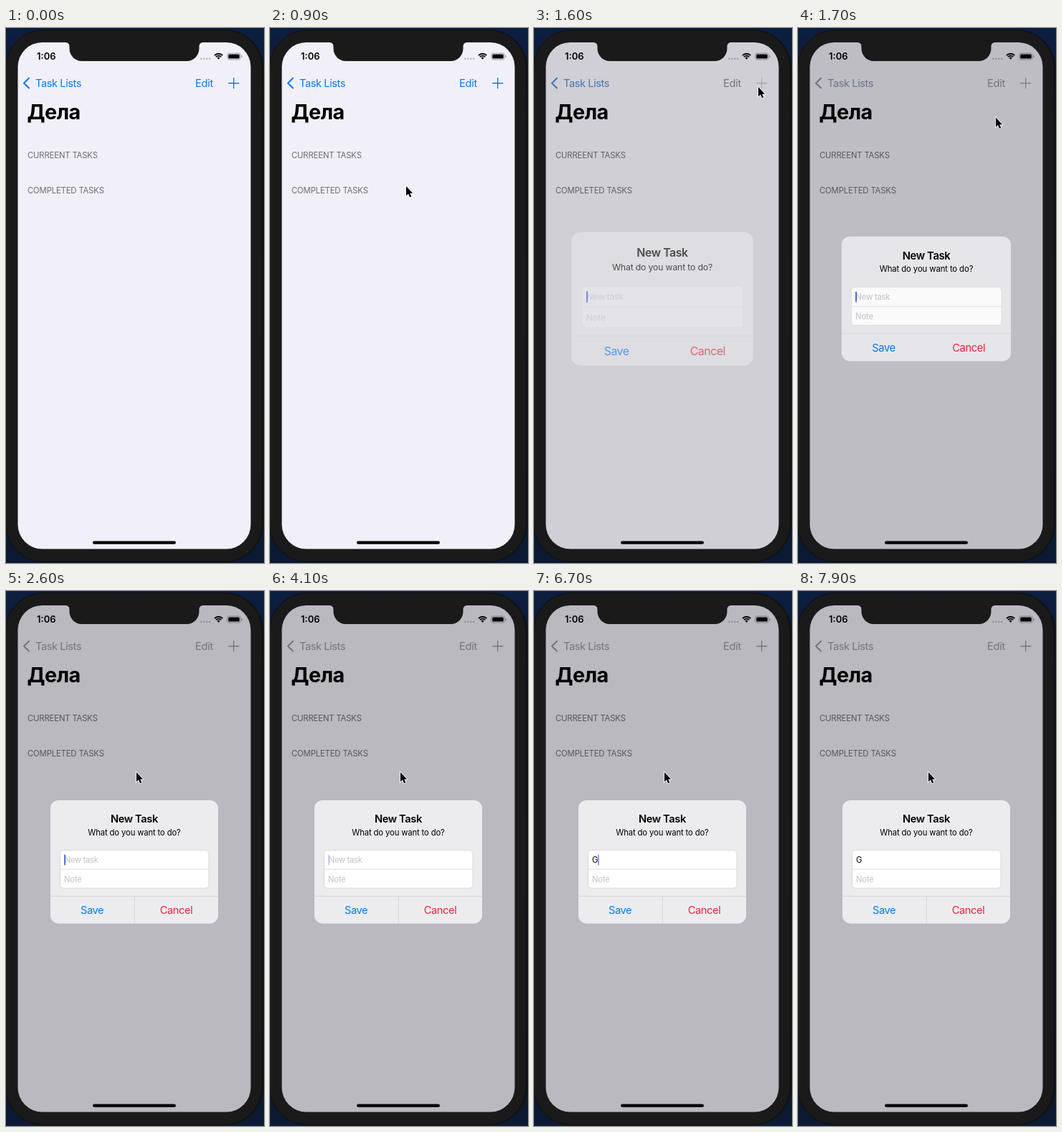
An HTML page with a canvas for the animation above (8 s loop, 360 px wide and 744 px high).

```html
<!DOCTYPE html>
<html lang="en">
<head>
<meta charset="utf-8">
<title>New task dialog</title>
<style>
html, body { margin: 0; width: 100%; height: 100%; overflow: hidden; background: #0a1730; }
canvas { display: block; width: 360px; height: 744px; }
</style>
</head>
<body>
<canvas id="stage"></canvas>
<script>
const W = 360, H = 744, LOOP = 8000, STEP = 100;
const canvas = document.getElementById('stage');
const ratio = window.devicePixelRatio || 1;
canvas.width = W * ratio;
canvas.height = H * ratio;
const ctx = canvas.getContext('2d');

// Motion tracks: [time, value, ...]
const POINTER = [[400, 200, 744], [600, 190, 430], [800, 182, 235], [900, 190, 220],
  [1200, 320, 71], [1500, 320, 71], [1600, 313, 82], [1700, 276, 124.5],
  [1800, 230, 187], [1900, 198, 235], [2000, 184, 250], [2100, 182, 252]];
const DIM = [[1500, 0], [1600, 0.6], [1700, 0.92], [1800, 1]];
const PRESS = [[1400, 0], [1500, 0.7], [1600, 0.6], [1700, 0.2], [1800, 0]];
const SHEET = [[1500, 0, 1.17], [1600, 0.5, 1.083], [1700, 0.88, 1.01], [1800, 1, 1]];
const TYPED_AT = 5500;
const CARET = [[6200, 1], [6400, 0], [6500, 0], [6800, 1], [6900, 1],
  [7200, 0], [7400, 0], [7600, 1], [7700, 1], [7900, 0]];

const MID_X = 179, SHEET_Y = 376.6;
const SCREEN = { x: 16.5, y: 20, w: 325, h: 704.5 };

const clamp = v => Math.min(1, Math.max(0, v));
const lerp = (a, b, k) => a + (b - a) * k;

function at(track, t) {
  if (t <= track[0][0]) return track[0].slice(1);
  for (let i = 1; i < track.length; i++) {
    const a = track[i - 1], b = track[i];
    if (t <= b[0]) {
      const k = (t - a[0]) / (b[0] - a[0]);
      return a.slice(1).map((v, j) => lerp(v, b[j + 1], k));
    }
  }
  return track[track.length - 1].slice(1);
}

function mix(a, b, k) {
  const part = (s, i) => parseInt(s.substr(1 + i * 2, 2), 16);
  return 'rgb(' + [0, 1, 2].map(i => Math.round(lerp(part(a, i), part(b, i), k))) + ')';
}

function box(x, y, w, h, r, fill) {
  ctx.beginPath();
  ctx.roundRect(x, y, w, h, r);
  ctx.fillStyle = fill;
  ctx.fill();
}

function text(str, x, y, size, color, { weight = 400, gap = 0, align = 'left' } = {}) {
  ctx.font = `${weight} ${size}px Inter, "Open Sans", sans-serif`;
  ctx.letterSpacing = gap + 'px';
  ctx.textAlign = align;
  ctx.fillStyle = color;
  ctx.fillText(str, x, y);
}

function stroke(points, color, width) {
  ctx.beginPath();
  points.forEach(([x, y], i) => i ? ctx.lineTo(x, y) : ctx.moveTo(x, y));
  ctx.strokeStyle = color;
  ctx.lineWidth = width;
  ctx.stroke();
}

function drawNotch() {
  const left = MID_X - 90.5, right = MID_X + 90.5;
  const top = SCREEN.y, bottom = top + 26, flare = 5.2, r = 17.3;
  ctx.beginPath();
  ctx.moveTo(left - flare, top - 1);
  ctx.lineTo(left - flare, top);
  ctx.arcTo(left, top, left, top + flare, flare);
  ctx.arcTo(left, bottom, left + r, bottom, r);
  ctx.arcTo(right, bottom, right, bottom - r, r);
  ctx.arcTo(right, top, right + flare, top, flare);
  ctx.lineTo(right + flare, top - 1);
  ctx.fillStyle = '#1a1a1a';
  ctx.fill();
}

function drawPhone(dim) {
  const sky = ctx.createLinearGradient(0, 0, 0, H);
  sky.addColorStop(0, '#0c1f42');
  sky.addColorStop(0.2, '#0a1428');
  sky.addColorStop(1, '#0c1a33');
  ctx.fillStyle = sky;
  ctx.fillRect(0, 0, W, H);
  box(-1, 2, 360, 741, 54, '#111112');
  box(0, 3.5, 357, 738, 52, '#1a1a1a');
  const { x, y, w, h } = SCREEN;
  box(x, y, w, h, 34, mix('#f1f0f8', '#bab9c0', dim));
  drawNotch();
  box(MID_X - 58, 713.5, 116, 4.3, 2.15, '#000000');
}

function drawStatus(dim) {
  text('1:06', 43, 44, 13, '#000000', { weight: 600 });
  const faint = mix('#b8b7be', '#939398', dim);
  for (let i = 0; i < 4; i++) box(271 + i * 4, 41.5, 2.6, 2.6, 1.3, faint);

  // Wi-Fi fan
  const cx = 296.6, cy = 43.8;
  ctx.strokeStyle = ctx.fillStyle = '#000000';
  ctx.lineCap = 'butt';
  ctx.lineWidth = 1.9;
  for (const r of [8, 5.2]) {
    ctx.beginPath();
    ctx.arc(cx, cy, r, -Math.PI * 0.75, -Math.PI * 0.25);
    ctx.stroke();
  }
  ctx.beginPath();
  ctx.moveTo(cx, cy);
  ctx.arc(cx, cy, 3, -Math.PI * 0.75, -Math.PI * 0.25);
  ctx.fill();

  // Battery
  const shell = mix('#98979d', '#77777b', dim);
  ctx.beginPath();
  ctx.roundRect(308.8, 35, 18.4, 9, 2.6);
  ctx.strokeStyle = shell;
  ctx.lineWidth = 0.9;
  ctx.stroke();
  box(310.2, 36.4, 15.6, 6.2, 1.5, '#000000');
  box(328.2, 38, 1.2, 3, 0.6, shell);
}

function drawList(t, dim) {
  const gray = '#75757a';
  const back = mix('#0a7aff', gray, dim);
  const edit = mix('#0a7aff', gray, clamp(dim * 1.6));
  ctx.lineCap = ctx.lineJoin = 'round';
  stroke([[32, 69.8], [25, 76.7], [32, 83.6]], back, 2.1);
  text('Task Lists', 41, 82, 14.7, back, { gap: -0.46 });
  text('Edit', 264, 82, 14.7, edit, { gap: -0.3 });

  ctx.globalAlpha = 1 - at(PRESS, t)[0];
  stroke([[310.7, 76.7], [324.7, 76.7]], edit, 1.4);
  stroke([[317.7, 69.7], [317.7, 83.7]], edit, 1.4);
  ctx.globalAlpha = 1;

  text('Дела', 29.5, 127, 28.8, '#000000', { weight: 700, gap: -0.5 });
  const label = mix('#6d6c72', '#56565a', dim);
  text('CURREENT TASKS', 30, 181, 11.3, label, { gap: -0.15 });
  text('COMPLETED TASKS', 30, 229.5, 11.3, label, { gap: -0.15 });
}

function caretAlpha(t) {
  if (t < TYPED_AT) return clamp(0.5 + 1.2 * Math.cos((t - 2600) / 870 * 2 * Math.PI));
  return at(CARET, t)[0];
}

function drawDialog(t) {
  const [shown, scale] = at(SHEET, t);
  if (!shown) return;
  const ink = clamp(shown * 1.3), soft = clamp(shown * 1.6 - 0.6);
  ctx.save();
  ctx.translate(MID_X, SHEET_Y);
  ctx.scale(scale, scale);
  ctx.translate(-MID_X, -SHEET_Y);

  ctx.globalAlpha = shown;
  box(62, 290.9, 234, 171.5, 11.5, '#ececef');

  ctx.globalAlpha = soft;
  ctx.beginPath();
  ctx.roundRect(75.5, 360.5, 207.5, 52.7, 5);
  ctx.fillStyle = '#ffffff';
  ctx.fill();
  ctx.strokeStyle = '#d2d2d5';
  ctx.lineWidth = 0.8;
  ctx.stroke();

  ctx.globalAlpha = shown;
  ctx.lineCap = 'butt';
  stroke([[75.5, 387], [283, 387]], '#d2d2d5', 0.8);
  stroke([[62, 424.5], [296, 424.5]], '#cfcfd3', 0.8);
  ctx.globalAlpha = clamp(shown * 8 - 7);
  stroke([[179.3, 424.5], [179.3, 462.4]], '#cfcfd3', 0.8);

  ctx.globalAlpha = ink;
  const center = { align: 'center' };
  text('New Task', MID_X, 322.4, 14.7, '#000000', { ...center, weight: 600, gap: -0.4 });
  text('What do you want to do?', MID_X, 339.6, 11.3, '#000000', { ...center, gap: -0.15 });
  text('Save', 120, 449, 14.7, '#0a76e8', { ...center, gap: -0.5 });
  text('Cancel', 237.5, 449, 14.7, '#e0283c', { ...center, gap: -0.45 });

  const typed = t >= TYPED_AT;
  if (typed) text('G', 81, 378.3, 11.3, '#000000');
  else text('New task', 81.5, 378.3, 11.3, '#c2c2c6', { gap: -0.3 });
  text('Note', 81, 404.7, 11.3, '#c2c2c6', { gap: -0.2 });

  ctx.globalAlpha = ink * caretAlpha(t);
  box(typed ? 89.2 : 81.2, 366.5, 1.6, 15, 0.8, '#3350cc');
  ctx.restore();
}

function drawPointer(t) {
  if (t < POINTER[0][0]) return;
  const [x, y] = at(POINTER, t);
  ctx.save();
  ctx.translate(x, y);
  ctx.scale(0.9, 0.9);
  ctx.beginPath();
  ctx.moveTo(0, 0);
  for (const [px, py] of [[0, 14.6], [3.3, 11.6], [5.7, 17], [8.1, 16], [5.8, 10.7], [10.2, 10.7]]) {
    ctx.lineTo(px, py);
  }
  ctx.closePath();
  ctx.lineJoin = 'miter';
  ctx.strokeStyle = '#ffffff';
  ctx.lineWidth = 1.8;
  ctx.stroke();
  ctx.fillStyle = '#000000';
  ctx.fill();
  ctx.restore();
}

function draw(now) {
  const t = Math.floor((now % LOOP) / STEP) * STEP;
  const [dim] = at(DIM, t);
  ctx.setTransform(ratio, 0, 0, ratio, 0, 0);
  drawPhone(dim);
  drawStatus(dim);
  drawList(t, dim);
  drawDialog(t);
  drawPointer(t);
}

let start = null;
function tick(now) {
  if (start === null) start = now;
  draw(now - start);
  requestAnimationFrame(tick);
}
draw(0);
requestAnimationFrame(tick);
</script>
</body>
</html>
```
